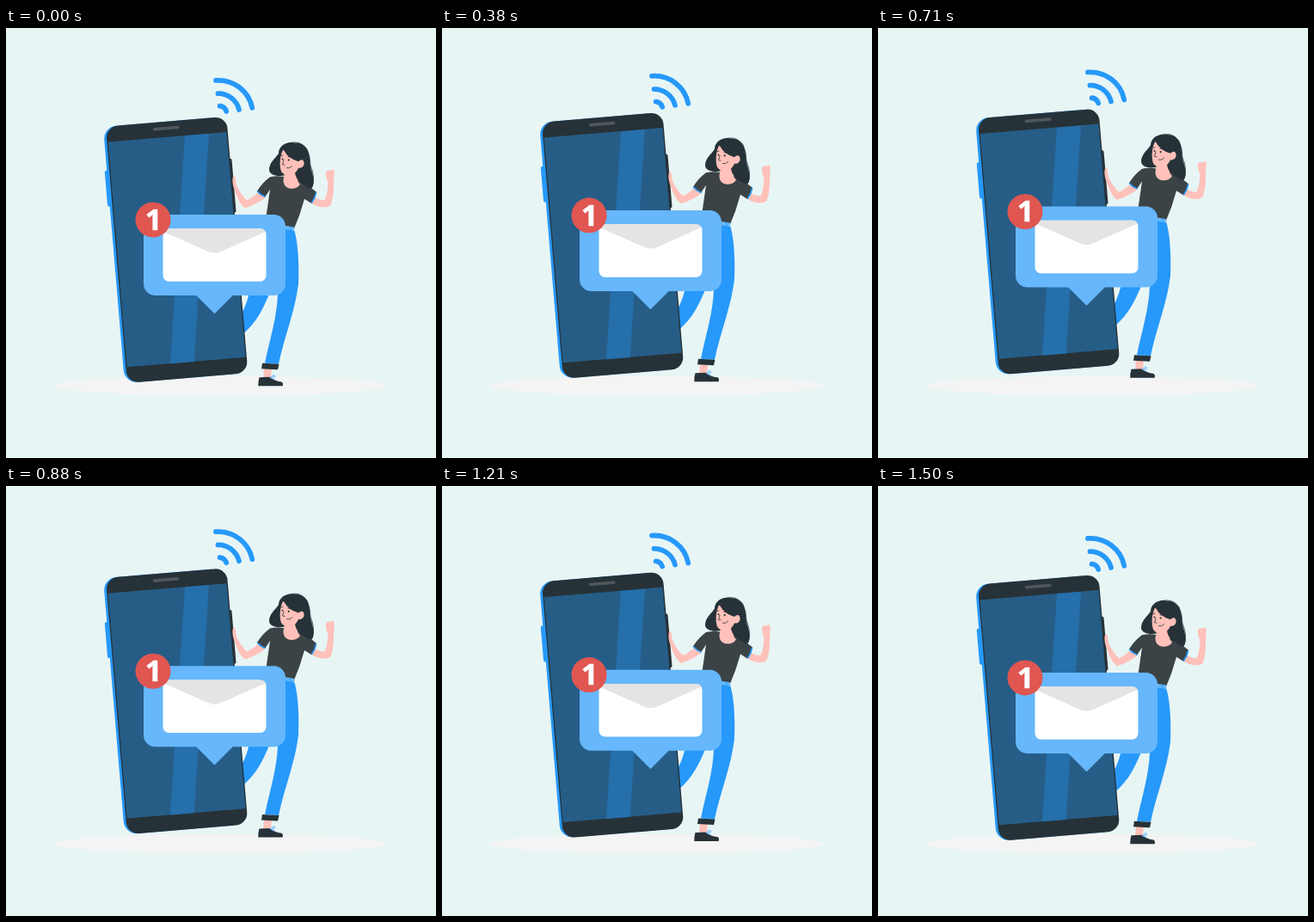
An HTML page for the animation above (1.54 s loop, 500 by 500 pixels).

```html
<!DOCTYPE html>
<html lang="en">
<head>
<meta charset="utf-8">
<style>
  html, body { margin: 0; width: 100%; height: 100%; overflow: hidden; background: #e8f5f5; }
  svg { display: block; width: 100%; height: 100%; }
  .blue { fill: #2699fb; }
  .pale { fill: #66b7fb; }
  .dark { fill: #263238; }
  .skin { fill: #ffc1b9; }
  .line { fill: none; stroke-linecap: round; stroke-linejoin: round; }
</style>
</head>
<body>
<svg viewBox="0 0 500 500">
  <ellipse cx="250" cy="416" rx="193.5" ry="11.2" fill="#f5f4f4"/>
  <g id="scene">
    <path class="line" stroke="#2699fb" stroke-width="5.8"
      d="M244 61.2A40 40 0 0 1 286.3 93.2M246.5 76.4A25 25 0 0 1 271 95.2M248.6 91A9 9 0 0 1 256.2 97.2"/>

    <!-- back leg -->
    <path class="blue" d="M284 302Q281 320 274 332L268 362Q282 352 291 339Q300 326 309 302Z"/>

    <!-- phone -->
    <g transform="translate(198.4 257.6) rotate(-4.8)">
      <rect class="blue" x="-75.8" y="-98" width="8" height="42" rx="2"/>
      <rect class="blue" x="-73.2" y="-149" width="140" height="299" rx="15"/>
      <rect class="dark" x="66" y="-100" width="6.6" height="63" rx="2"/>
      <rect class="dark" x="-70.3" y="-149" width="141" height="299.2" rx="14"/>
      <rect x="-69" y="-131" width="138.3" height="262.7" fill="#265d87"/>
    </g>
    <path fill="#256fab" d="M208 125.6L236 123.3L218.7 388.3L191 390.6Z"/>
    <path class="line" stroke="#4f575c" stroke-width="3.6" d="M172.6 118.1L199.8 115.8"/>

    <!-- arms -->
    <path class="skin" d="M294 191Q285 199 280 200.5Q273 194 268 183L266.5 173Q264.5 171.500 263.5 175Q263 183 266 189Q270 203 277.500 209.5Q288 207 301 198Z"/>
    <path class="skin" d="M355 195Q365 201 370.5 200.5Q374.5 192 374.3 179Q371.500 174 372 168Q373 165 377 166L380 164.5Q382.5 166 381.5 171Q381.500 175 381 178Q381.5 198 377 207Q368 212 353 203Z"/>

    <!-- head and shirt -->
    <path class="dark" d="M334 133.500C325 132.500 317 138 317 146C313 152 306 157 306 165C306 171 315 173 321 172L343 170L352 146C349 136 342 133.500 334 133.500Z"/>
    <path class="line" stroke="#263238" stroke-width=".7" d="M328 134.500Q342 129.500 350 141Q354 150 354 160Q360 173 356 185"/>
    <path fill="#3b4346" d="M307 173.5Q314 172 323 173L341 177Q352 183 361 191Q360 198 355 204L347 199Q342 218 334 236L301 230Q304 209 307 188L301 197Q296 195 292 190Q298 180 307 173.5Z"/>
    <path class="line" stroke="#2699fb" stroke-width="1.6" d="M292.5 190.5Q296 194.500 301 196.5M360.5 192Q359.5 198 355.5 203.5"/>
    <path class="skin" d="M325 166L323 174C321 181 325 187 332 187Q339 187 342 182Q337 177 337 165Z"/>
    <path class="dark" d="M336 163C335 172 339 178 344 181Q350 186 355 187C360 181 357 173 356 168C353 160 354 154 352 146L340 143Z"/>
    <path class="skin" d="M322 142C318 150 318 161 320 167Q325 174 333 171Q338 168 340 163C345 164 348 159 346 155Q344 152 340 155.500Q328 152 323.500 143Z"/>
    <path class="line" stroke="#263238" stroke-width=".8"
      d="M320 149L322 148.5M328 150L331 150.5M323 154L321.5 159L324 159.5M326.5 163Q330 164 332.5 161"/>
    <circle class="dark" cx="321.5" cy="152.800" r="1"/>
    <circle class="dark" cx="328.7" cy="153.800" r="1.1"/>

    <!-- front leg -->
    <path class="blue" d="M318 230L335 235C340 250 341 278 340 298C336 330 324 358 317 391L301 390C307 361 315 337 316 310Z"/>
    <path class="pale" d="M318 229L335.500 232L335 236.500L318 233Z"/>
    <path class="line" stroke="#2699fb" d="M330 231L331.5 236"/>
    <path class="skin" d="M300 395H309L308 407L299 408Z"/>
    <path class="dark" d="M298 390L317.500 391L316 397.500L297 396.500Z"/>
    <path class="dark" d="M294.500 406.500L306 406Q312 410.700 320.500 411.700Q323 413.700 321.500 416.500H293.300Q293 411.700 294.500 406.500Z"/>
    <path class="line" stroke="#66b7fb" d="M307.5 406.500L311.500 403.500L313 405.500L308 407L312.500 409"/>

    <!-- message -->
    <path class="pale" d="M220 310H265L242.500 332.500Z"/>
    <rect class="pale" x="160" y="217.300" width="165" height="94" rx="13.500"/>
    <rect x="182.500" y="233.500" width="120" height="61.600" rx="7" fill="#fff"/>
    <path fill="#e4e4e4" d="M183.300 237.200Q185 233.500 189.500 233.500H295.500Q300 233.500 301.700 237.200L251 259.800Q242.500 264 234 259.800Z"/>
    <circle cx="171" cy="223.200" r="20.500" fill="#e05651"/>
    <text x="161.800" y="235" fill="#fff" stroke="#fff" stroke-width=".6" font-family="Open Sans, Noto Sans, sans-serif" font-size="34.500" font-weight="700">1</text>
  </g>
</svg>
<script>
  const LOOP = 1540, PERIOD = 1500, LEAD = 20, RISE = 10;
  const scene = document.getElementById("scene");
  const start = performance.now();

  // Constant-speed float: up for half the period, then down again.
  function draw() {
    const time = (performance.now() - start) % LOOP;
    const phase = ((time + LEAD) % PERIOD) / PERIOD;
    const y = RISE * (Math.abs(2 * phase - 1) - 1);
    scene.setAttribute("transform", `translate(0 ${y.toFixed(2)})`);
    requestAnimationFrame(draw);
  }
  draw();
</script>
</body>
</html>
```
